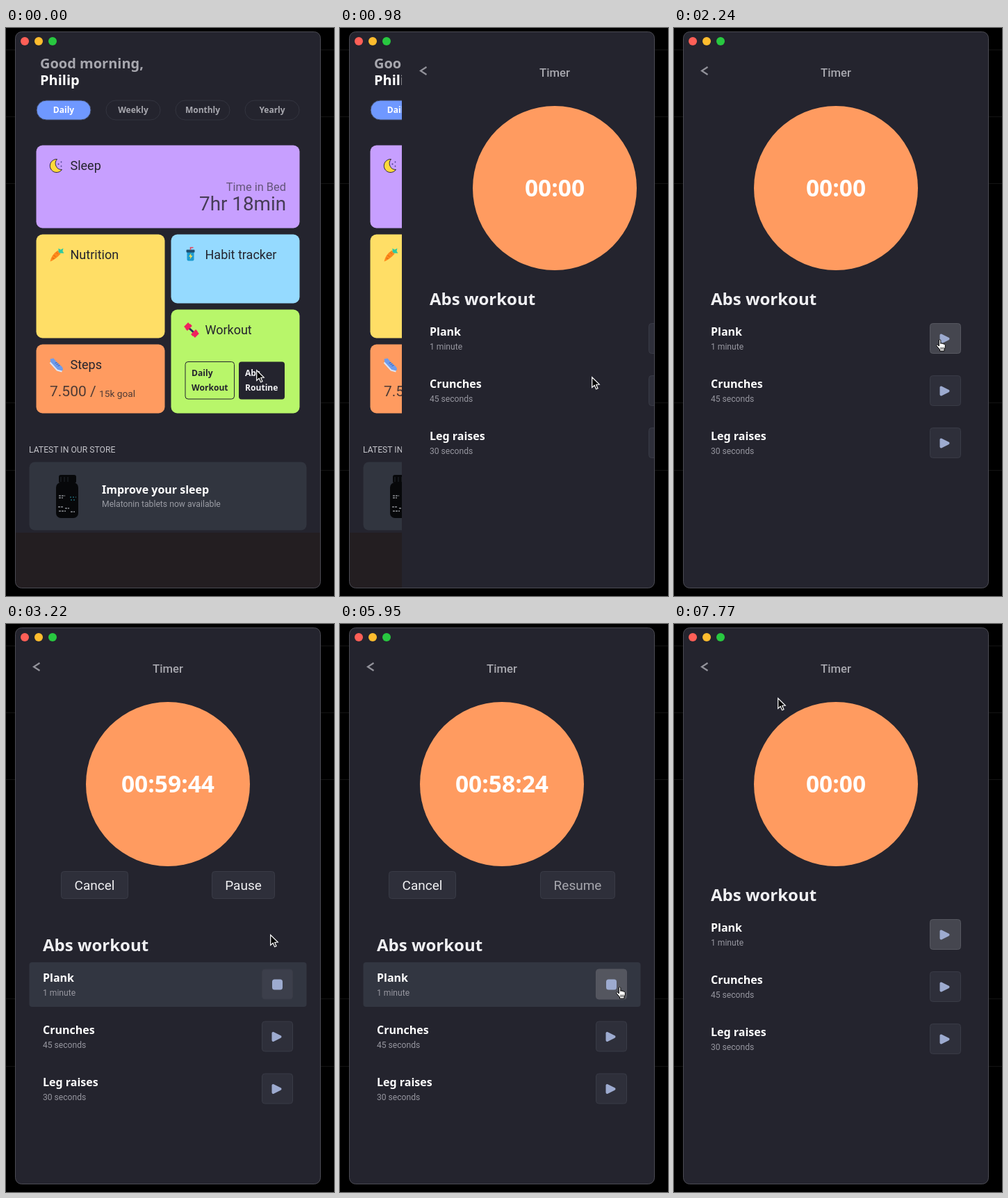
Recreate the animation shown at these times as an HTML page. Size 472 by 816 pixels, loop 8000 ms.

```html
<!DOCTYPE html>
<html lang="en">
<head>
<meta charset="utf-8">
<title>Workout timer</title>
<style>
  html, body { margin: 0; width: 100%; height: 100%; overflow: hidden; background: #000; }
  svg { display: block; width: 472px; height: 816px; }
  text { font-family: Roboto, Inter, sans-serif; white-space: pre; }
  .b { font-family: "Noto Sans", "Open Sans", sans-serif; font-weight: 700; }
</style>
</head>
<body>
<svg id="stage" viewBox="0 0 472 816"></svg>
<script>
const LOOP = 8000, STEP = 70;
const BG = '#24242e', GREY = '#a7a7ae', INK = '#24242e', ICON = '#9dabd0', ORANGE = '#ff9b60';

const rect = (x, y, w, h, r, fill, extra = '') =>
  `<rect x="${x}" y="${y}" width="${w}" height="${h}" rx="${r}" fill="${fill}" ${extra}/>`;
const circle = (x, y, r, fill, extra = '') =>
  `<circle cx="${x}" cy="${y}" r="${r}" fill="${fill}" ${extra}/>`;
const path = (d, fill, extra = '') => `<path d="${d}" fill="${fill}" ${extra}/>`;
const text = (s, x, y, size, fill, extra = '') =>
  `<text x="${x}" y="${y}" font-size="${size}" fill="${fill}" ${extra}>${s}</text>`;
const bold = (s, x, y, size, fill, extra = '') => text(s, x, y, size, fill, 'class="b" ' + extra);
const group = (x, y, body) => `<g transform="translate(${x} ${y})">${body}</g>`;
const MID = 'text-anchor="middle"', END = 'text-anchor="end"';

// Icons are drawn in a 20 by 20 box.
const moon = path('M11 1A9.5 9.5 0 1 0 18 16A9 9 0 0 1 11 1Z', '#ffd93b', 'stroke="#2b2440"')
  + circle(13, 8, 1.1, '#4b3f8f') + circle(17, 5, .9, '#4b3f8f') + circle(17, 11, .9, '#4b3f8f');
const carrot = path('M12 4L16 9Q9 17 1 20Q3 10 12 4Z', '#ff8a1c')
  + path('M6 11l3 2M4 15l3 1M10 7l2 2', 'none', 'stroke="#d9640c"')
  + path('M13 6L13 1L16 3L20 1L19 5L21 8L15 8Z', '#2fc9a0');
const bottle = rect(4, 5, 10, 14, 2, '#1b9bd0') + rect(3, 3, 12, 4, 1, '#1d4e70')
  + path('M9 3V0H13', 'none', 'stroke="#e0455e" stroke-width="1.6"')
  + path('M10 8L6.5 13H9L8 17L12 11.5H9.5Z', '#ffe14d');
const dumbbell = path('M5 6L15 15', 'none', 'stroke="#29305c" stroke-width="3"')
  + path('M1 7L7 1M3 10L10 3', 'none', 'stroke="#f0205e" stroke-width="4"')
  + path('M11 18L18 11M14 20L20 14', 'none', 'stroke="#f0205e" stroke-width="4"');
const shoe = path('M1 2L6 1L10 6L18 13Q21 17 18 19L12 18L2 8Z', '#6f9bea')
  + path('M1 7L11 18L18 20', 'none', 'stroke="#dbe4f5" stroke-width="2"')
  + path('M8 8l3-1M10 10l3-1M12 12l3-1', 'none', 'stroke="#3c5fb0"');

const card = (x, y, w, h, fill, icon, title) =>
  rect(x, y, w, h, 9, fill) + group(x + 19, y + 19, icon) + text(title, x + 49, y + 35, 18, INK);

function pill(label, i) {
  const x = 44 + i * 100, on = i === 0;
  return rect(x, 104, 78, 28, 14, on ? '#6f98ff' : 'none', `stroke="${on ? '#3d4358' : '#33343f'}"`)
    + bold(label, x + 39, 122, 12, on ? '#fff' : GREY, MID);
}

const jar = rect(76, 642, 25, 12, 3, '#07080a') + rect(72, 653, 32, 51, 7, '#07080a')
  + path('M79 645V652M84 645V652M89 645V652', 'none', 'stroke="#23262c"')
  + path('M76 672h9M76 675h6M75 688h8M85 690h6M76 694h10M93 695h6', 'none', 'stroke="#c9cdd4" stroke-dasharray="3 1"')
  + path('M92 674h9M93 678h7', 'none', 'stroke="#2b8fa3" stroke-dasharray="2 2"');

const home = rect(13, 725, 440, 80, 0, '#231e21')
  + bold('Good morning,', 49, 58, 20, GREY) + bold('Philip', 49, 82, 20, '#fff')
  + ['Daily', 'Weekly', 'Monthly', 'Yearly'].map(pill).join('')
  + card(43.5, 168.5, 379, 119, '#c79fff', moon, 'Sleep')
  + text('Time in Bed', 403, 234, 16.4, '#635579', END)
  + text('7hr 18min', 403, 262, 27.8, '#463c56', END)
  + card(43.5, 296.5, 185, 149, '#ffde66', carrot, 'Nutrition')
  + card(237.5, 296.5, 185, 99, '#95daff', bottle, 'Habit tracker')
  + card(43.5, 454.5, 185, 99, ORANGE, shoe, 'Steps')
  + text('7.500 /', 63, 529, 21, '#4d3a35') + text('15k goal', 134, 530, 13.7, '#4d3a35')
  + card(237.5, 404.5, 185, 149, '#b8f66a', dumbbell, 'Workout')
  + rect(258, 479.5, 70.5, 53.5, 4, 'none', `stroke="${INK}"`)
  + bold('Daily', 267, 500, 12.1, INK) + bold('Workout', 267, 521, 12.1, INK)
  + rect(335, 479.5, 66, 54, 4, INK)
  + bold('Abs', 344, 500, 12.1, '#f2f2f4') + bold('Routine', 344, 521, 12.1, '#f2f2f4')
  + text('LATEST IN OUR STORE', 33, 610, 12.2, '#c3c3c9')
  + rect(33.5, 623.5, 399, 98, 8, '#31353f') + jar
  + bold('Improve your sleep', 138, 669, 16, '#fff')
  + text('Melatonin tablets now available', 138, 688, 12.2, '#9a9ca4');

const play = path('M384.5 441.5V451.5L394.5 446.5Z', ICON,
  `stroke="${ICON}" stroke-width="4" stroke-linejoin="round"`);
const stop = rect(383, 439, 15, 15, 3.5, ICON);

function row(title, sub, y, active, hover) {
  const fill = hover ? (active ? '#54565f' : '#45464f') : active ? '#3c3f4b' : '#2e2f3a';
  return group(0, y,
    (active ? rect(33.5, 414.5, 399, 64, 4, '#323641') : '')
    + bold(title, 53, 442, 16, '#fff') + text(sub, 53, 462, 12.1, '#9797a0')
    + rect(368.5, 424.5, 44, 43, 4, fill, `stroke="${hover ? '#565760' : '#393b46'}"`)
    + (active ? stop : play));
}

const button = (label, x, w, fill, ink) =>
  rect(x, 355.5, w, 39, 4, fill, 'stroke="#393b46"')
  + text(label, x + w / 2, 382, 19, ink, MID);

const two = n => String(n).padStart(2, '0');

function timer(t) {
  const active = t >= 2730 && t < 6230, paused = t >= 4550;
  const spent = Math.min(176, Math.round(56 + (t - 3220) * .09));
  const left = 6000 - spent;
  const clock = active ? `00:${two(Math.floor(left / 100))}:${two(left % 100)}` : '00:00';
  const shift = active ? 71.5 : 0;
  const lit = t >= 4340 && t < 5530;
  const hover = active ? t >= 5880 : t >= 2170;
  const fill = lit ? '#45464f' : '#2e2f3a';
  const controls = !active ? '' : paused
    ? button('Cancel', 70.5, 96, '#2e2f3a', '#f0f0f2')
      + button('Resume', 288.5, 107, fill, lit ? '#e4e4e8' : GREY)
    : button('Cancel', 79.5, 96, '#2e2f3a', '#f0f0f2') + button('Pause', 296.5, 90, fill, '#f0f0f2');
  return rect(13, 43, 440, 762, 0, BG)
    + path('M48.5 56L40 61.5L48.5 67', 'none', 'stroke="#92929a" stroke-width="2.2"')
    + text('Timer', 233, 70, 16.7, GREY, MID + ' font-weight="500"')
    + circle(233, 230, 118, ORANGE)
    + bold(clock, 233, 242, 33.5, '#fff', MID)
    + controls
    + bold('Abs workout', 53, 398 + shift, 24, '#f0f0f3')
    + row('Plank', '1 minute', shift, active, hover)
    + row('Crunches', '45 seconds', 75 + shift)
    + row('Leg raises', '30 seconds', 150 + shift);
}

// Pointer path: time, x, y.
const track = [
  [0, 360, 491], [140, 360, 491], [350, 362, 501], [1260, 362, 501], [1470, 254, 378],
  [1750, 254, 378], [2240, 377, 447], [2660, 377, 447], [2800, 380, 446], [3360, 380, 446],
  [3640, 352, 394], [3710, 345, 386], [3920, 339, 380], [5390, 339, 380], [5600, 179, 225],
  [5880, 390, 508], [5950, 397, 521], [6720, 397, 521], [6790, 400, 519], [7490, 400, 519], [7770, 149, 106]
];

function pointAt(t) {
  const i = track.findIndex(k => k[0] > t);
  if (i < 0) return track.at(-1).slice(1);
  const [t0, x0, y0] = track[i - 1], [t1, x1, y1] = track[i], p = (t - t0) / (t1 - t0);
  return [x0 + (x1 - x0) * p, y0 + (y1 - y0) * p];
}

const arrow = path('M.7 .7V15.5L4.2 12.3L6.6 17.8L9 16.8L6.7 11.4L11.2 11Z', '#000', 'stroke="#fff" stroke-width="1.2"');
const hand = path('M4.3 10V2Q4.3 .6 5.5 .6T6.8 2V6.5Q7 5.4 8 5.5T9 6.8Q9.3 5.8 10.3 6.1T11.2 7.5Q11.6 6.8 12.5 7.2T13.3 8.8V12L12 14.5V17H5.5V15L1 9.8Q.3 8.5 1.5 8T3.5 9Z',
  '#fff', 'stroke="#000" stroke-width="1"')
  + path('M7 11.5V15M9 11.5V15M11 11.5V15', 'none', 'stroke="#000" stroke-width=".8"');

function cursor(t) {
  const pointing = (t >= 2170 && t < 2730) || (t >= 5880 && t < 6790);
  return group(...pointAt(t), pointing ? hand : arrow);
}

function ripple(t) {
  if (t >= 560 && t < 700) return circle(363, 503, 23, '#fff', 'opacity=".12"');
  if (t >= 2450 && t < 2520) return circle(381, 447, 32, '#fff', 'opacity=".08"');
  return '';
}

const backdrop = rect(0, 0, 472, 816, 0, '#000')
  + [31, 127, 223, 538, 635].map(y => rect(0, y, 472, 1, 0, '#141414')).join('')
  + '<clipPath id="win"><rect x="13.5" y="5.5" width="439" height="799" rx="9"/></clipPath>';
const frame = rect(13.5, 5.5, 439, 799, 9, 'none', 'stroke="#4b4b53"')
  + ['#ff5f57', '#febc2e', '#28c840'].map((c, i) => circle(27 + i * 20, 19, 6, c)).join('');

function draw(t) {
  const p = Math.min(1, Math.max(0, (t - 803) / 400));
  const slide = t < 840 ? 440 : Math.round(439 * (1 - p) ** 3);
  return backdrop
    + `<g clip-path="url(#win)">${rect(13, 5, 440, 800, 0, BG)}${slide ? home : ''}`
    + `${slide < 440 ? group(slide, 0, timer(t)) : ''}${ripple(t)}</g>`
    + frame + cursor(t);
}

const stage = document.getElementById('stage');
let shown = -1;
function tick() {
  const t = Math.floor((performance.now() % LOOP) / STEP) * STEP;
  if (t !== shown) stage.innerHTML = draw(shown = t);
  requestAnimationFrame(tick);
}
tick();
</script>
</body>
</html>
```
